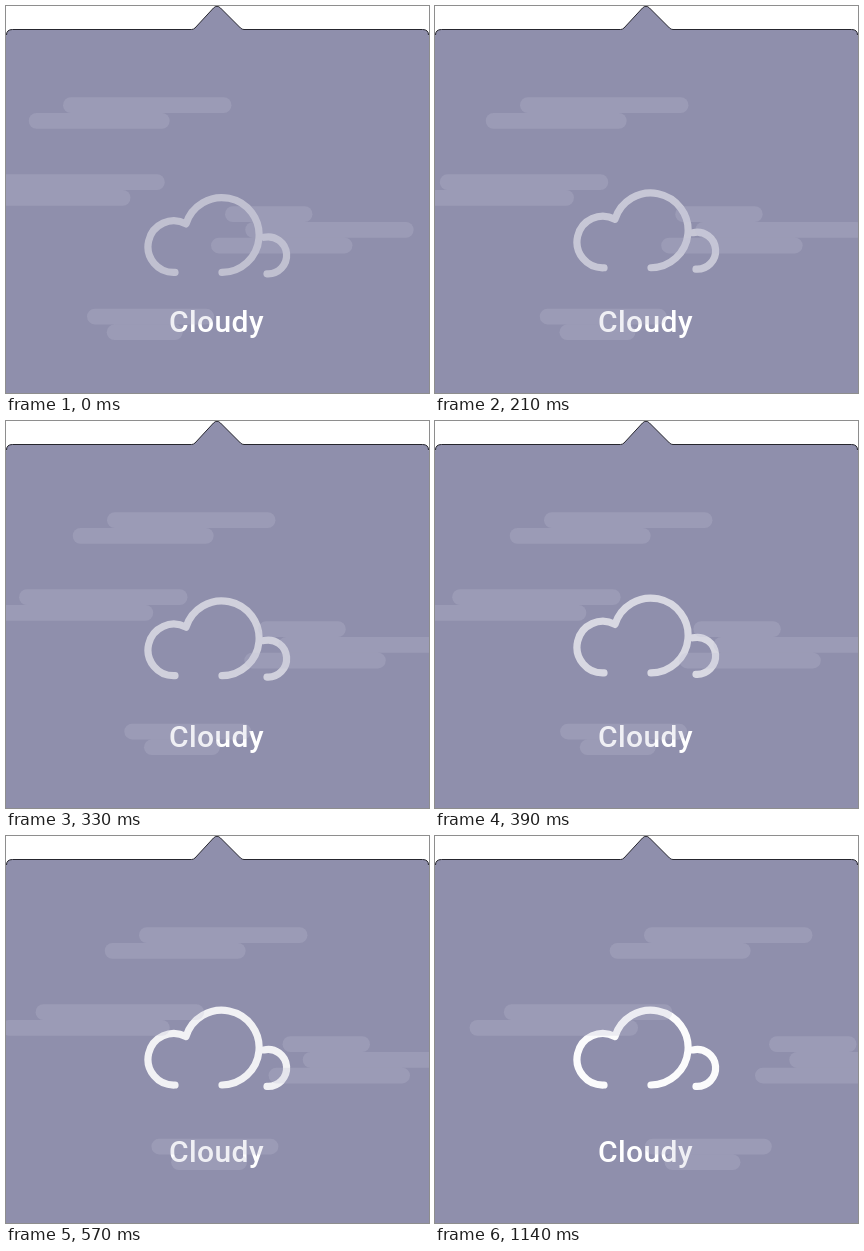
An HTML page for the animation above (1170 ms loop, 423 px wide and 387 px high).

```html
<!DOCTYPE html>
<html lang="en">
<head>
<meta charset="utf-8">
<title>Cloudy</title>
<style>
  html, body { margin: 0; width: 100%; height: 100%; overflow: hidden; background: #fff; }
  svg { display: block; width: 423px; height: 387px; }
  text { font: 500 30px Roboto, "Open Sans", sans-serif; letter-spacing: .4px; fill: #fff; }
  .bars { fill: #bebed2; fill-opacity: .25; }
  .icon { fill: none; stroke: #fff; stroke-width: 7.2; stroke-linecap: round; stroke-linejoin: round; }
</style>
</head>
<body>
<svg viewBox="0 0 423 387">
  <path fill="#8f8fac" d="M0 387V30Q0 23.5 6.5 23.5H185.5Q187.5 23.5 189 22L207.5 2Q211 -1.5 214.5 2L234.5 22Q236 23.5 238 23.5H416.5Q423 23.5 423 30V387Z"/>
  <path fill="none" stroke="#26262e" d="M.5 29Q.5 23.5 6.5 23.5H185.5Q187.5 23.5 189 22L207.5 2Q211 -1.5 214.5 2L234.5 22Q236 23.5 238 23.5H416.5Q422.5 23.5 422.5 29"/>
  <g id="icon" class="icon">
    <path d="M169 249A25.8 25.8 0 1 1 180 200.5A37.4 37.4 0 1 1 216 249"/>
    <path d="M258 213.9A18.5 18.5 0 1 1 261 250.4"/>
  </g>
  <text x="163" y="326">Cloudy</text>
  <g id="sky" class="bars"></g>
</svg>
<script>
const LOOP = 1170, TICK = 30, BAR = 15.7;

// speed in px per ms, then bars as [x, y, width]
const groups = [
  { speed: .1333, bars: [[57, 91.3, 168.5], [22.7, 107, 141]] },
  { speed: .0689, bars: [[-9.7, 168.3, 168.5], [-44, 184, 168.5]] },
  { speed: .1009, bars: [[219, 200.3, 87.5], [239.2, 216, 168.5], [205, 231.7, 141.5]] },
  { speed: .113, bars: [[81, 302.7, 127], [100.7, 318.4, 76]] }
];
const fade = [[0, .44], [150, .48], [270, .53], [330, .58], [450, .73], [600, .91], [750, 1], [1170, .97]];

const icon = document.getElementById('icon');
const sky = document.getElementById('sky');

function add(parent, tag, attrs = {}) {
  const node = document.createElementNS('http://www.w3.org/2000/svg', tag);
  for (const key in attrs) node.setAttribute(key, attrs[key]);
  return parent.appendChild(node);
}

for (const group of groups) {
  group.node = add(sky, 'g');
  for (const [x, y, width] of group.bars) {
    add(group.node, 'rect', { x, y, width, height: BAR, rx: BAR / 2 });
  }
}

function lerpTable(table, t) {
  const i = Math.max(1, table.findIndex(([at]) => at >= t));
  const [t0, v0] = table[i - 1], [t1, v1] = table[i];
  return v0 + (v1 - v0) * (t - t0) / (t1 - t0);
}

function easeInOut(p) {
  return p < .5 ? 2 * p * p : 1 - 2 * (1 - p) * (1 - p);
}

function draw(t) {
  for (const { node, speed } of groups) {
    node.setAttribute('transform', `translate(${speed * t} 0)`);
  }
  const p = Math.min(1, Math.max(0, (t - 20) / 520));
  icon.setAttribute('transform', `translate(0 ${17.4 * (1 - easeInOut(p))})`);
  icon.setAttribute('opacity', lerpTable(fade, t));
}

const start = performance.now();
function loop() {
  const t = (performance.now() - start) % LOOP;
  draw(Math.floor(t / TICK) * TICK);
  requestAnimationFrame(loop);
}
draw(0);
requestAnimationFrame(loop);
</script>
</body>
</html>
```
